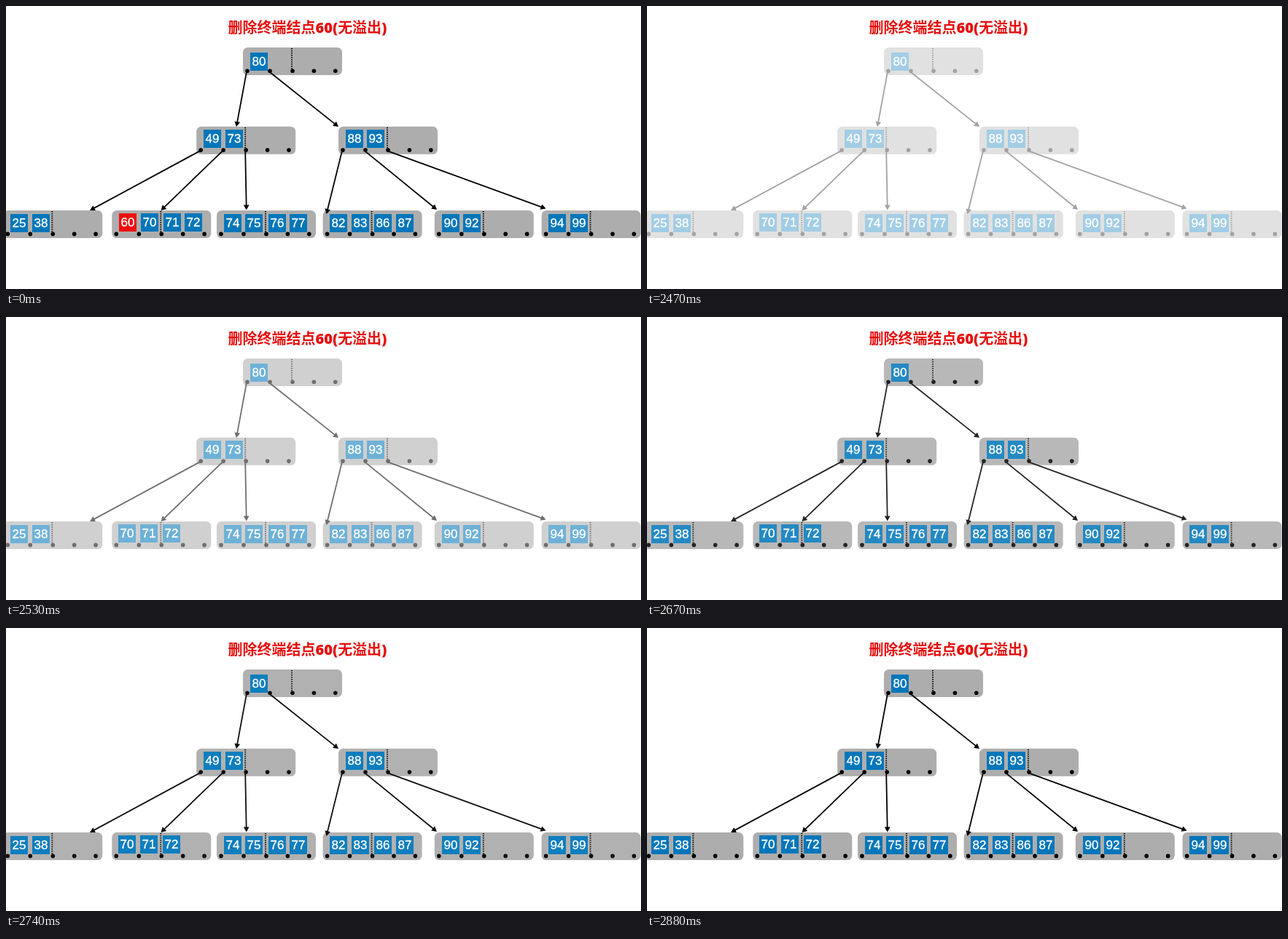
Write an HTML page that moves like this. It is 871 px wide and 389 px high and loops after 7.62 s.

```html
<!DOCTYPE html>
<html lang="zh-CN">
<head>
<meta charset="utf-8">
<title>B-tree deletion</title>
<style>
  html, body { margin: 0; width: 100%; height: 100%; overflow: hidden; background: #fff; }
  svg { display: block; }
  .title { font: bold 20px "Noto Sans CJK SC", "Noto Sans CJK", "Noto Sans CJK JP", sans-serif; fill: #e6100f; }
  .latin { font-family: "Open Sans", sans-serif; font-weight: 800; }
  .key { font: 17px "Liberation Sans", Arial, sans-serif; fill: #fff; stroke: #fff; stroke-width: .35px; text-anchor: middle; }
</style>
</head>
<body>
<svg width="871" height="389" viewBox="0 0 871 389">
  <text class="title" x="304.5" y="37.3">删除终端结点<tspan class="latin">60(</tspan>无溢出<tspan class="latin">)</tspan></text>
  <g id="tree">
    <g id="nodes"></g>
    <g id="before"></g>
    <g id="after"></g>
    <g id="links"></g>
  </g>
</svg>
<script>
const LOOP = 7620, CUT = 2470, STEP = 70;
const BLUE = '#0076ba', RED = '#f20d0d', GREY = '#adadad';
const [tree, boxes, before, after, links] =
  ['tree', 'nodes', 'before', 'after', 'links'].map(id => document.getElementById(id));

function add(parent, tag, attrs, text = '') {
  const el = document.createElementNS('http://www.w3.org/2000/svg', tag);
  for (const name in attrs) el.setAttribute(name, attrs[name]);
  el.textContent = text;
  parent.appendChild(el);
}

// Slots are evenly spaced, with a little extra room around the dotted middle.
const dotX = i => 6 + 29.4 * i + 1.6 * Math.min(i, 2);
const keyX = i => 9.7 + 29.6 * i + (i > 1 ? 1.6 : 0);
const DOT_Y = 32.3;

function addKeys(parent, x, y, keys) {
  keys.split(' ').forEach((key, i) => {
    const left = Math.round(x + keyX(i)), top = Math.round(y);
    add(parent, 'rect', { x: left, y: top, width: 24, height: 25, fill: key === '60' ? RED : BLUE });
    add(parent, 'text', { class: 'key', x: left + 12, y: top + 18.3 }, key);
  });
}

function addBox(x, y) {
  add(boxes, 'rect', { x, y, width: 136, height: 38, rx: 6.5, fill: GREY });
  add(boxes, 'path', {
    d: `M${x + 67} ${y + 1}v30`, stroke: '#000', 'stroke-width': 1.8, 'stroke-dasharray': 1.5
  });
  for (let i = 0; i < 5; i++)
    add(links, 'circle', { cx: x + dotX(i), cy: y + DOT_Y, r: 2.8 });
}

function addArrow(x1, y1, x2, y2) {
  const len = Math.hypot(x2 - x1, y2 - y1);
  const angle = Math.atan2(y2 - y1, x2 - x1) * 180 / Math.PI;
  add(links, 'path', {
    transform: `translate(${x1} ${y1}) rotate(${angle})`,
    d: `M0 -.9H${len - 7}v-3L${len} 0l-7 3.9v-3H0Z`
  });
}

const node = (x, keys, tip, kids = []) => ({ x, keys, tip, kids });
const root = node(325, '80', null, [
  node(261.2, '49 73', [316, 166], [
    node(-3.7, '25 38', [115, 281]),
    node(145.3, '60 70 71 72', [212.5, 281]),
    node(289, '74 75 76 77', [329.8, 280.5])
  ]),
  node(456, '88 93', [456, 166], [
    node(434.6, '82 83 86 87', [439.5, 286]),
    node(587.8, '90 92', [591, 280]),
    node(734.6, '94 99', [740.5, 278.5])
  ])
]);

const rowY = [57, 165.8, 281.1];
const padY = [7, 4.5, 4.5];

function addTree({ x, keys, kids }, depth = 0) {
  const y = rowY[depth], top = y + padY[depth];
  addBox(x, y);
  if (keys.startsWith('60')) {
    addKeys(before, x, top - 1, keys);
    addKeys(after, x - .6, top - .8, keys.slice(3));
  } else {
    addKeys(boxes, x, top, keys);
  }
  kids.forEach((kid, i) => {
    addArrow(x + dotX(i) - 1, y + DOT_Y + 1, ...kid.tip);
    addTree(kid, depth + 1);
  });
}
addTree(root);

// The new tree fades in with a quadratic ease-out, held in steps.
function fade(t) {
  const step = Math.floor((t - CUT + 10) / STEP);
  const p = Math.min(1, .2 + .14 * step);
  return t < CUT ? 1 : 1 - (1 - p) ** 2;
}

const start = performance.now();
function draw() {
  const t = (performance.now() - start) % LOOP;
  const done = t >= CUT;
  tree.setAttribute('opacity', fade(t));
  before.setAttribute('display', done ? 'none' : 'inline');
  after.setAttribute('display', done ? 'inline' : 'none');
  requestAnimationFrame(draw);
}
draw();
</script>
</body>
</html>
```
